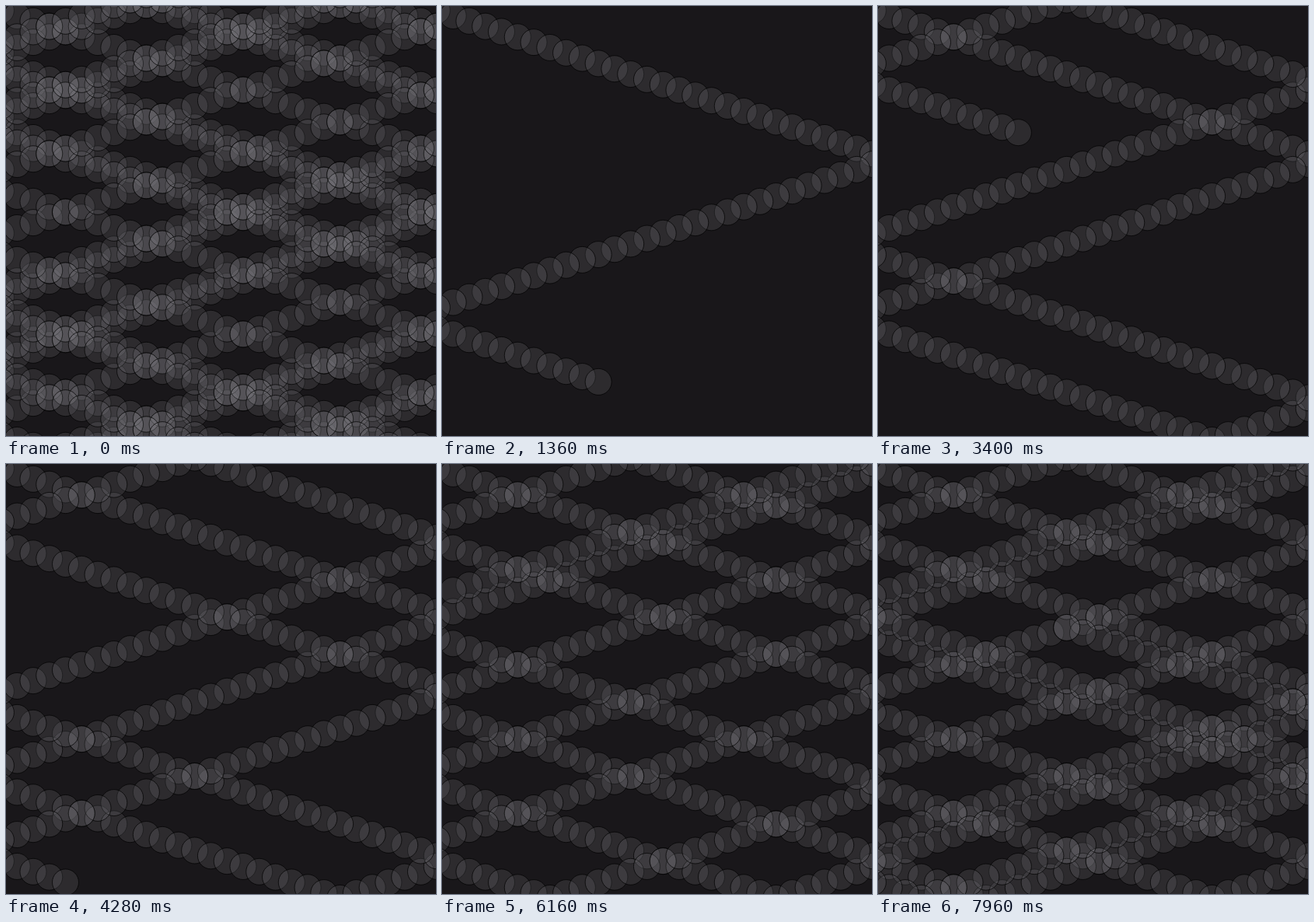
An HTML page with a canvas that plays this animation: 553x553 px, repeating every 8000 ms.

```html
<!DOCTYPE html>
<html>
<head>
<meta charset="utf-8">
<style>
  html, body { margin: 0; width: 100%; height: 100%; overflow: hidden; background: #19171a; }
  canvas { display: block; }
</style>
</head>
<body>
<canvas id="stage" width="553" height="553"></canvas>
<script>
const ctx = document.getElementById('stage').getContext('2d');
const LOOP = 8000, TICK = 40, RESTART = 160;
const X0 = 14.2, Y0 = 12.5, DX = 20.77, DY = 6.824, RADIUS = 17;
const COLS = 30, ROWS = 83; // steps between opposite walls
const LAST_COL = 26, WEAVE_ROWS = 80, MIRROR = 74;

// Triangle wave: the step position between two walls.
const bounce = (step, size) => size - Math.abs(step % (2 * size) - size);

// 60 steps a second, with a slow sway in pace.
function stepsAt(t) {
  const sway = 1.75 * Math.cos(2 * Math.PI * (t - 1000) / 3900);
  return Math.max(0, Math.floor(0.06 * t - 11.02 + sway));
}

function dot(col, row) {
  ctx.beginPath();
  ctx.arc(X0 + col * DX, Y0 + row * DY, RADIUS, 0, 2 * Math.PI);
  ctx.fill();
  ctx.stroke();
}

// One falling diagonal and its mirror image.
function drawPair(offset) {
  for (let col = -1; col <= LAST_COL; col++) {
    dot(col, col + offset);
    dot(col, MIRROR - offset - col);
  }
}

// The finished weave: evenly spaced diagonals, most of them doubled.
function drawWeave() {
  for (let i = -2; i <= 7; i++) {
    const offset = Math.round(i * WEAVE_ROWS / 7);
    const single = [0, 3, 4].includes((i + 7) % 7);
    for (const shift of single ? [0] : [-1, 1]) drawPair(offset + shift);
  }
}

function drawTrail(steps) {
  for (let i = 0; i <= steps; i++) dot(bounce(i, COLS) - 3, bounce(i, ROWS) - 3);
}

function render(t) {
  ctx.fillStyle = '#19171a';
  ctx.fillRect(0, 0, 553, 553);
  ctx.fillStyle = 'rgba(135, 135, 137, 0.18)';
  ctx.strokeStyle = '#000';
  ctx.lineWidth = 0.7;
  if (t < RESTART) drawWeave();
  else drawTrail(stepsAt(t));
}

const start = performance.now();
let shown = -1;

function frame() {
  const t = Math.floor((performance.now() - start) % LOOP / TICK) * TICK;
  if (t !== shown) render(shown = t);
  requestAnimationFrame(frame);
}
frame();
</script>
</body>
</html>
```
